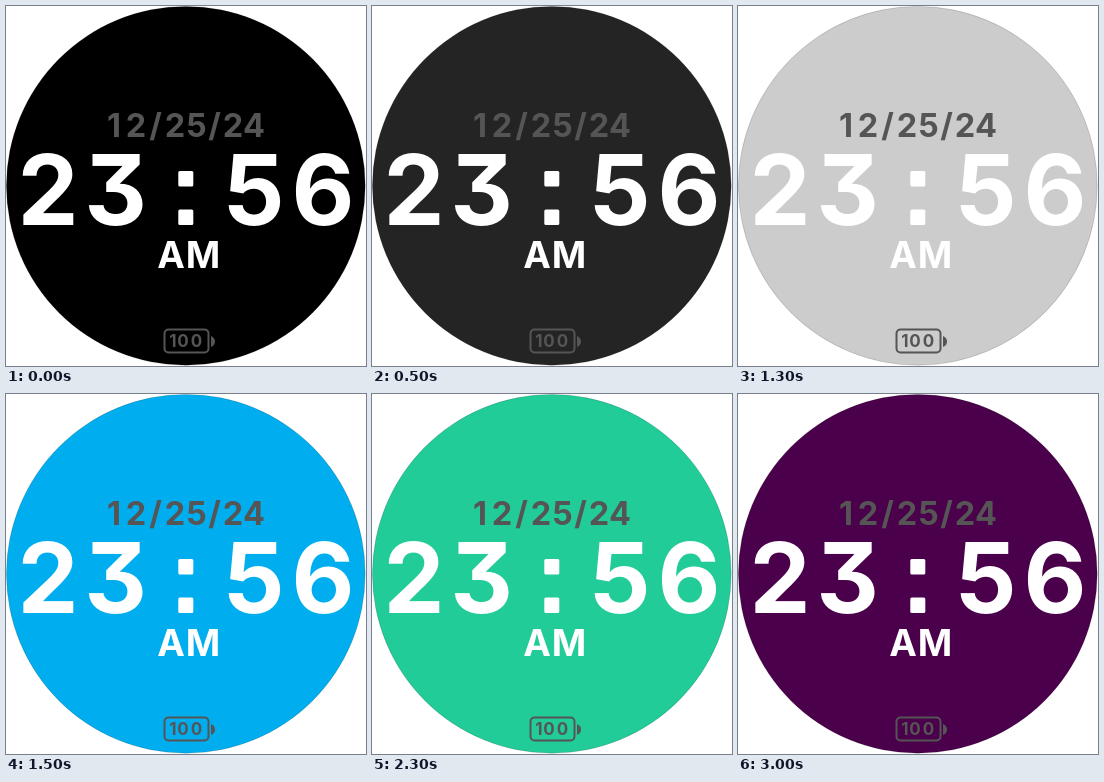
Animation of 360 by 360 pixels, one loop 3500 ms. Source, as an HTML page:

```html
<!DOCTYPE html>
<html lang="en">
<head>
<meta charset="utf-8">
<title>Watch face</title>
<style>
  html, body { margin: 0; width: 100%; height: 100%; overflow: hidden; background: #fff; }
  svg { display: block; width: 100vw; height: 100vh; }
  text {
    font-family: Inter, Roboto, sans-serif;
    font-weight: 700;
    font-feature-settings: "cv09"; /* flat-topped 3 */
    text-anchor: middle;
  }
  .dim { fill: #555; }
  .lit { fill: #fff; }
</style>
</head>
<body>
<svg viewBox="0 0 360 360">
  <circle id="face" cx="179.8" cy="179.8" r="179.4" stroke="#000" stroke-opacity=".3" stroke-width=".5"/>
  <text class="dim" font-size="32.5" x="108 130 149.5 169 190.5 208.5 227 248" y="130.5">12/25/24</text>
  <g class="lit">
    <text font-size="97" x="42 109.5" y="219">23</text>
    <rect x="172.3" y="165" width="15" height="15.5" rx="1.5"/>
    <rect x="172.3" y="203.5" width="15" height="15.5" rx="1.5"/>
    <text font-size="97" x="248.5 317" y="219">56</text>
    <text font-size="37" x="165 197" y="262">AM</text>
  </g>
  <g class="dim">
    <rect x="158.5" y="323.5" width="44" height="23" rx="4" fill="none" stroke="#555" stroke-width="2"/>
    <path d="M205 330q4 1.5 4 5.5t-4 5.5z"/>
    <text font-size="17" x="167 177 190.5" y="341">100</text>
  </g>
</svg>
<script>
  const COLORS = ['#000', '#242424', '#ccc', '#00aeef', '#22cc99', '#f00', '#4b004b'];
  const STEP = 500;
  const face = document.getElementById('face');

  function draw() {
    const step = Math.floor(performance.now() / STEP) % COLORS.length;
    face.setAttribute('fill', COLORS[step]);
    requestAnimationFrame(draw);
  }
  draw();
</script>
</body>
</html>
```
